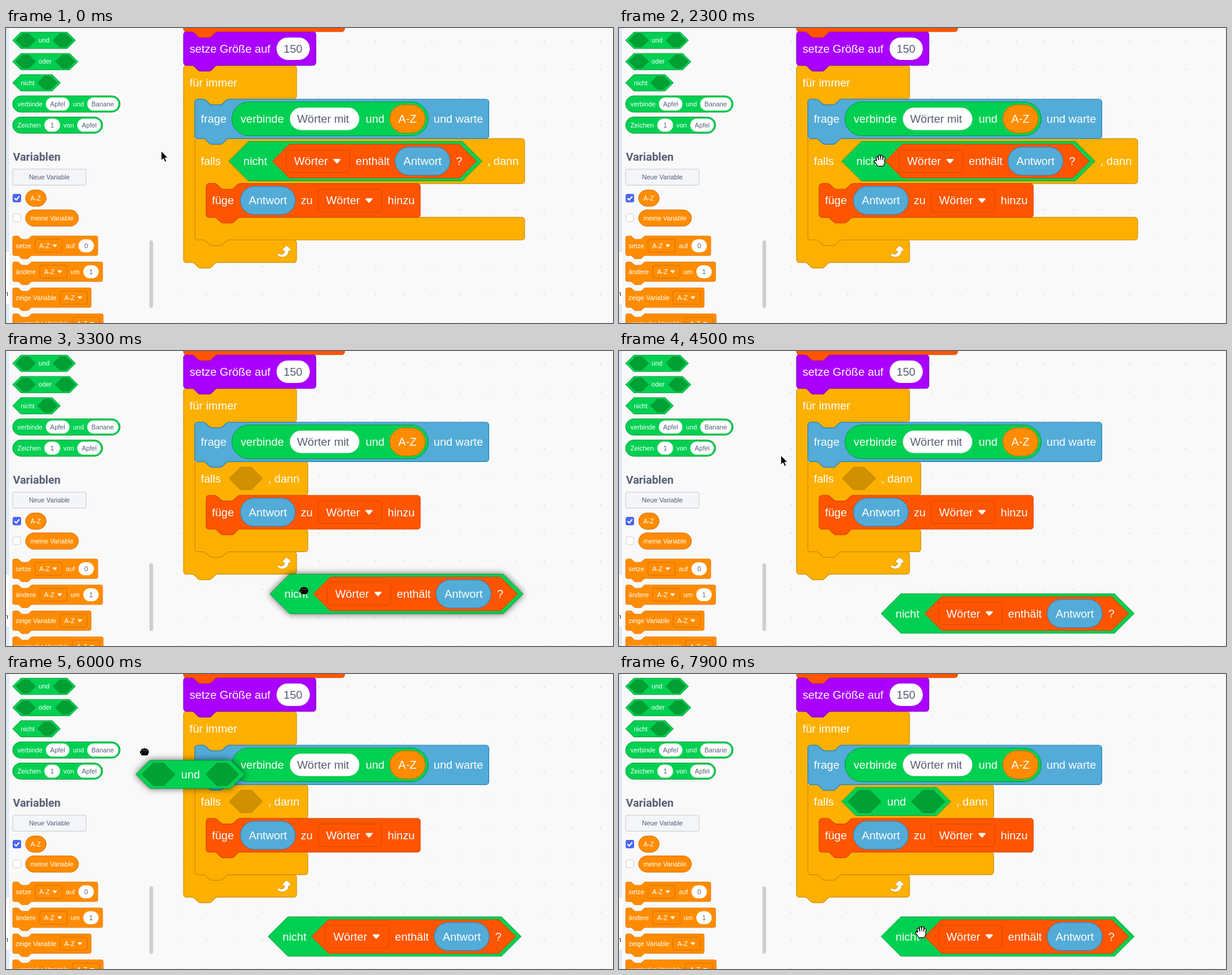
An HTML page that plays this animation: 1005 px wide and 489 px high, repeating every 8000 ms.

```html
<!DOCTYPE html>
<html lang="de">
<head>
<meta charset="utf-8">
<title>Blöcke verschieben</title>
<style>
html, body { margin: 0; width: 100%; height: 100%; overflow: hidden; background: #f9f9f9; }
svg { display: block; width: 1005px; height: 489px; font-family: "Liberation Sans", Arial, sans-serif; }
.drag { filter: drop-shadow(0 0 6px rgba(0, 0, 0, .6)); }
text { white-space: pre; }
</style>
</head>
<body>
<svg id="stage" viewBox="0 0 1005 489" xmlns="http://www.w3.org/2000/svg"></svg>
<script>
(() => {
const BIG = 1.1664, SMALL = 0.675, LOOP = 8000, STEP = 100;
const INK = '#575e75';
// fill, border
const C = {
  control: ['#fdb000', '#cf8e00'],
  sense: ['#53abd8', '#2a83b5'],
  op: ['#00d052', '#009c37'],
  list: ['#ff5500', '#d94500'],
  look: ['#a900ff', '#8300c9'],
  data: ['#ff8c00', '#db6e00'],
  input: ['#ffffff', 'none'],
  opSlot: ['#00a034', '#009430'],
  controlSlot: ['#d09000', '#c68800']
};
const NOTCH = 'c2 0 3 1 4 2l4 4c1 1 2 2 4 2h12c2 0 3-1 4-2l4-4c1-1 2-2 4-2';
const BUMP = 'c-2 0-3 1-4 2l-4 4c-1 1-2 2-4 2h-12c-2 0-3-1-4-2l-4-4c-1-1-2-2-4-2';
const TURN = 'a4 4 0 0 1 4 4', BACK = 'a4 4 0 0 1-4 4';

const paint = ([fill, line]) => `fill="${fill}" stroke="${line}"`;

function text(x, cy, str, k = BIG, fill = '#fff') {
  const size = 16 * k;
  return `<text x="${x}" y="${cy + size * 0.35}" font-size="${size}" fill="${fill}">${str}</text>`;
}
function shape(x, y, d, col, k) {
  return `<path transform="translate(${x} ${y}) scale(${k})" d="${d}" ${paint(col)}/>`;
}
const upperEdge = w => `M0 4a4 4 0 0 1 4-4h8${NOTCH}H${w - 4}${TURN}`;
const lowerEdge = h => `V${h - 4}${BACK}H48${BUMP}H4a4 4 0 0 1-4-4z`;

function stack(x, y, width, h, col, k = BIG) {
  return shape(x, y, upperEdge(width / k) + lowerEdge(h), col, k);
}
function mouth(x, y, width, head, inner, col) {
  const w = width / BIG, end = head + inner;
  const d = `${upperEdge(w)}V${head - 4}${BACK}H64${BUMP}H20a4 4 0 0 0-4 4V${end - 4}a4 4 0 0 0 4 4H${w - 4}${TURN}`;
  return shape(x, y, d + lowerEdge(end + 32), col, BIG);
}
// The next shapes are centred on cy, their height is in block units
function hexPath(x, cy, w, h) {
  const r = h / 2;
  return `M${x} ${cy}l${r} ${-r}h${w - h}l${r} ${r}l${-r} ${r}h${h - w}z`;
}
function hex(x, cy, w, units, col, k = BIG) {
  return `<path d="${hexPath(x, cy, w, units * k)}" ${paint(col)}/>`;
}
function box(x, cy, w, units, col, k, r) {
  const h = units * k;
  return `<rect x="${x}" y="${cy - h / 2}" width="${w}" height="${h}" rx="${r}" ${paint(col)}/>`;
}
const pill = (x, cy, w, units, col, k = BIG) => box(x, cy, w, units, col, k, units * k / 2);
const field = (x, cy, w, str, tx, k = BIG) =>
  pill(x, cy, w, 32, C.input, k) + text(tx, cy, str, k, INK);
const answer = (x, cy) => pill(x, cy, 91, 40, C.sense) + text(x + 14, cy, 'Antwort');

function menu(x, cy, w, str, pad, col, k = BIG) {
  const ax = x + w - 18 * k;
  return box(x, cy, w, 32, col, k, 4 * k) + text(x + pad, cy, str, k) +
    `<path transform="translate(${ax} ${cy}) scale(${k})" d="M-4-2.2h8l-4 4.4z" fill="#fff" stroke="#fff" stroke-width="2" stroke-linejoin="round"/>`;
}

function notBlock() {
  const c = 32.7;
  return hex(0, c, 419, 56, C.op) + text(24, c, 'nicht') +
    hex(72, c, 338, 48, C.list) + menu(95, c, 105, 'Wörter', 13, C.list) +
    text(210, c, 'enthält') + answer(275, c) + text(376, c, '?');
}
function andBlock() {
  const c = 23.4;
  return hex(0, c, 180, 40, C.op) + hex(10, c, 55, 32, C.opSlot) +
    text(75, c, 'und') + hex(115.5, c, 55, 32, C.opSlot);
}

function loopIcon(y) {
  return `<path transform="translate(444.5 ${y}) scale(${BIG})" fill="#fff" stroke="#cf8e00" stroke-width=".8"
    d="M23 9.2 18.4 4.8Q17.2 4 16 4.8L11.7 9.2Q10.5 11.2 12.9 12H14.4C14 17 9 17.5 7 15.5 4.5 15 3.5 17 4.6 18.3 11 23.5 20 20 20.2 12H21.8Q24 11.5 23 9.2Z"/>`;
}

// Loop with the condition inside; head is the height of the condition row
function program(head, width, thenX, slot) {
  const ifY = 183.3, row = ifY + head * BIG / 2, addY = ifY + head * BIG, c = addY + 28;
  const foot = addY + 80 * BIG;
  return mouth(294, 62, 187, 48, 56 + head + 80, C.control) + text(304, 90.5, 'für immer') +
    loopIcon(foot + 4.5) +
    mouth(312.7, ifY, width, head, 48, C.control) +
    text(322.5, row, 'falls') + text(thenX, row, ', dann') +
    (slot ? hex(369.5, row, 55.5, 32, C.controlSlot) : '') +
    stack(331.4, addY, 354.5, 48, C.list) + text(341, c, 'füge') + answer(388, c) +
    text(488, c, 'zu') + menu(517, c, 105, 'Wörter', 13, C.list) + text(632, c, 'hinzu');
}

function fixedBlocks() {
  const c = 150.6;
  return stack(294, 6, 219, 48, C.look) + text(304, 34.3, 'setze Größe auf') + field(448, 34.3, 55, '150', 459.5) +
    stack(294, -50, 266.5, 48, C.list) +
    stack(312.7, 118, 486.7, 56, C.sense) + text(322.5, c, 'frage') +
    pill(374, c, 325, 48, C.op) + text(388.5, c, 'verbinde') + field(470, c, 115, 'Wörter mit', 482) +
    text(595.5, c, 'und') + pill(635.5, c, 58.5, 40, C.data) + text(649.5, c, 'A-Z') + text(708, c, 'und warte');
}

function palette() {
  const k = SMALL, t = (x, cy, s, col) => text(x, cy, s, k, col);
  const slot = (x, cy) => hex(x, cy, 32.4, 32, C.opSlot, k);
  const bool = (cy, w) => hex(11, cy, w, 40, C.op, k);
  const row = (cy, w, label) => stack(11, cy - 16.2, w, 48, C.data, k) + t(16, cy, label);
  const pick = (x, cy) => menu(x, cy, 45, 'A-Z', 7, C.data, k);
  const put = (x, cy, w, s, tx) => field(x, cy, w, s, tx, k);
  return bool(20.5, 104) + slot(16.5, 20.5) + t(54, 20.5, 'und') + slot(78, 20.5) +
    bool(55.7, 108) + slot(16.5, 55.7) + t(54, 55.7, 'oder') + slot(82, 55.7) +
    bool(90.8, 79) + t(24.5, 90.8, 'nicht') + slot(52.5, 90.8) +
    pill(11, 126, 178, 40, C.op, k) + t(19, 126, 'verbinde') + put(66, 126, 39, 'Apfel', 73) +
    t(111, 126, 'und') + put(134.5, 126, 51.5, 'Banane', 141.5) +
    pill(11, 161, 149, 40, C.op, k) + t(19, 161, 'Zeichen') + put(63.5, 161, 26, '1', 73.5) +
    t(95, 161, 'von') + put(118, 161, 39, 'Apfel', 125.5) +
    `<text x="11.5" y="219.5" font-family="Roboto, sans-serif" font-weight="700" font-size="18.5" fill="${INK}">Variablen</text>` +
    `<rect x="11" y="234" width="121.5" height="26.5" rx="2" fill="#f4f5f9" stroke="#c8cad0"/>` + t(38, 247.3, 'Neue Variable', INK) +
    `<rect x="11" y="275" width="14" height="14" rx="3" fill="#4c66f5"/><path d="M14 282l3 3 5-6" fill="none" stroke="#fff" stroke-width="2"/>` +
    `<rect x="11.5" y="308" width="13" height="13" rx="3" fill="#fff" stroke="#d0d0d0"/>` +
    pill(32.5, 282, 34, 40, C.data, k) + t(40.5, 282, 'A-Z') +
    pill(32.5, 315, 87.5, 40, C.data, k) + t(40.5, 315, 'meine Variable') +
    row(361, 141, 'setze') + pick(48, 361) + t(99, 361, 'auf') + put(120, 361, 25.5, '0', 129.8) +
    row(404, 149, 'ändere') + pick(56, 404) + t(107, 404, 'um') + put(128, 404, 25.5, '1', 137.8) +
    row(447, 130, 'zeige Variable') + pick(89.5, 447) +
    row(490, 150, 'verstecke Variable') + pick(110, 490) +
    `<rect x="237.5" y="352" width="6" height="112" rx="3" fill="#cecece"/>`;
}

const PALM = 'M-4 0L5.5 0 6.5 2 4.5 7.5H-2.5L-5 4z';
const FINGERS = 'M-3 1L-4.8-5M0 0L-1-7.5M2.7 0L3-7.5M5.6 1L6.8-4.8M-3.5 5L-7.5 .8';
const openHand = ['#000', '#fff'].map((col, i) =>
  `<path d="${PALM}${FINGERS}" fill="${col}" stroke="${col}" stroke-width="${i ? 2.2 : 4.6}" stroke-linecap="round" stroke-linejoin="round"/>`).join('');
const fist = `<path d="M-5-3Q-3.5-6-1.7-4.5 0-7 2-4.5 4-6 5-3.5 7.5-3 7 1L5 5.5H-4L-7 1Q-7.5-1-5-1z" fill="#000" stroke="#000"/>
  <path d="M-2-3.2v2M1-3.2v2M4-2.8v2M-4.5 1v1.5" stroke="#ddd" stroke-width=".8"/>`;
const arrow = '<path d="M0 0V15.5L3.6 12.2 6.2 18 8.7 16.9 6.2 11.2H11z" fill="#000" stroke="#fff" stroke-width=".9"/>';

const $ = id => document.getElementById(id);
const layer = (id, inner) => `<g id="${id}">${inner}</g>`;
$('stage').innerHTML = `<defs><pattern id="dots" x="284" y="21" width="${40 * BIG}" height="${40 * BIG}" patternUnits="userSpaceOnUse">
    <rect width="2" height="2" fill="#dedede"/></pattern></defs>
  <rect width="1005" height="489" fill="#f9f9f9"/><rect x="245" width="760" height="489" fill="url(#dots)"/>
  <rect width="5" height="489" fill="#e0ebf7"/><rect y="371" width="5" height="86" fill="#fff"/>` +
  text(-2.5, 440, 'n', 0.7, '#222') + palette() +
  layer('full', program(64, 546, 797, false)) +
  layer('empty', program(48, 187, 434, true)) +
  layer('filled', program(48, 307.5, 558.5, false)) + fixedBlocks() +
  layer('hint', `<path d="${hexPath(369.5, 211.3, 55.5, 32 * BIG)}" fill="none" stroke="#fff" stroke-width="4" stroke-linejoin="round"/>`) +
  layer('not', notBlock()) + layer('and', andBlock()) +
  layer('arrow', arrow) + layer('hand', openHand) + layer('fist', fist);

const show = (id, on) => { $(id).style.display = on ? '' : 'none'; };
const place = (id, [x, y]) => $(id).setAttribute('transform', `translate(${x.toFixed(2)} ${y.toFixed(2)})`);

const smooth = u => u * u * (3 - 2 * u);
const out = u => 1 - (1 - u) * (1 - u);

// Keys: time, x, y, easing towards this key
const pointer = [
  [500, 257, 204], [700, 115, 48], [800, 75, 13], [900, 75, 13], [1000, 67, 14],
  [1600, 417, 165, smooth], [1800, 417, 165], [1900, 414, 164], [2000, 414, 164], [2300, 432, 220, smooth],
  [2500, 432, 220], [3300, 493, 397], [3400, 496, 415], [3600, 497, 434, out], [4100, 497, 434],
  [4500, 268, 173], [5000, 95, 30, out], [5300, 67, 22], [5600, 67, 22], [5800, 90, 36], [5900, 150, 75],
  [6000, 229, 129], [6800, 439, 212, out], [6900, 439, 212], [7000, 442, 217], [7300, 442, 217], [7900, 500, 428, smooth]
];
const notPath = [[2500, 369, 188], [3300, 437, 370], [3400, 438, 389], [3600, 434, 402.5, out]];
const andPath = [[5700, 26, 20], [5800, 62, 40], [5900, 139, 85], [6000, 215, 143], [6800, 383, 197, out], [6900, 383, 197], [7000, 369, 188]];

function at(keys, t) {
  const i = keys.findIndex(k => k[0] > t);
  if (i === 0) return keys[0].slice(1, 3);
  if (i < 0) return keys[keys.length - 1].slice(1, 3);
  const [t0, x0, y0] = keys[i - 1], [t1, x1, y1, ease] = keys[i];
  const raw = (t - t0) / (t1 - t0), u = ease ? ease(raw) : raw;
  return [x0 + (x1 - x0) * u, y0 + (y1 - y0) * u];
}
const within = (t, ...spans) => spans.some(([a, b]) => t >= a && t < b);

function draw(time) {
  const t = Math.floor(time % LOOP / STEP) * STEP;
  const dragNot = within(t, [2600, 3900]), dragAnd = within(t, [5700, 7000]);
  const notPos = at(notPath, t), andPos = at(andPath, t);
  show('full', t < 2600);
  show('empty', within(t, [2600, 7000]));
  show('filled', t >= 7000);
  place('not', notPos);
  place('and', andPos);
  show('and', t >= 5700);
  $('not').setAttribute('class', dragNot ? 'drag' : '');
  $('and').setAttribute('class', dragAnd ? 'drag' : '');
  const [x, y] = dragNot ? notPos : andPos;
  show('hint', (dragNot || dragAnd) && Math.hypot(x - 369, y - 193) < 45);

  const closed = dragNot || within(t, [5600, 7000]);
  const open = !closed && within(t, [800, 1100], [1400, 2600], [3900, 4300], [5100, 5600], [7000, LOOP]);
  const kind = closed ? 'fist' : open ? 'hand' : 'arrow';
  for (const id of ['arrow', 'hand', 'fist']) show(id, id === kind);
  place(kind, at(pointer, t));
}
function tick() {
  draw(performance.now());
  requestAnimationFrame(tick);
}
tick();
})();
</script>
</body>
</html>
```
